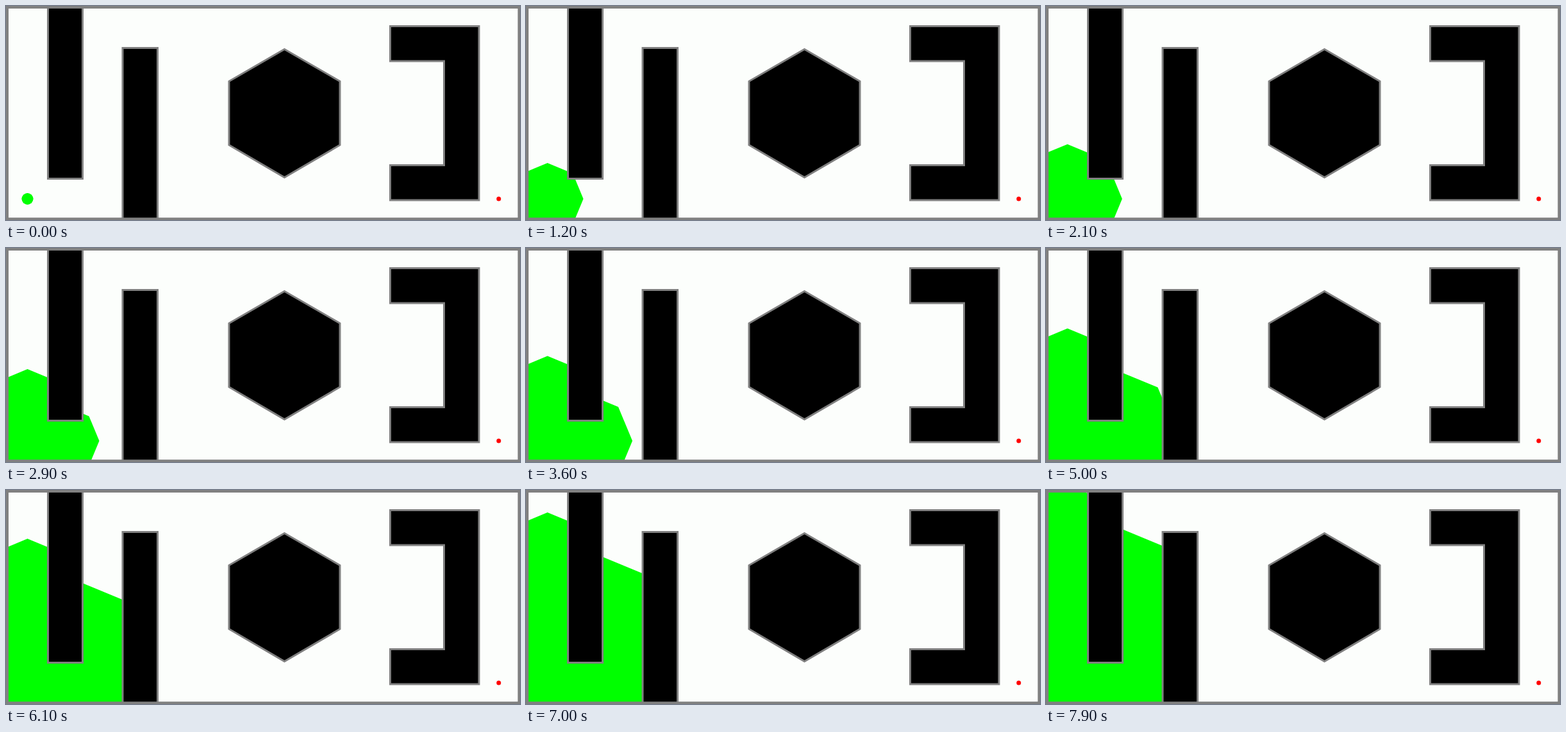
Write an HTML page without scripts that moves like this. It is 802 px wide and 334 px high and loops after 8000 ms.

```html
<!DOCTYPE html>
<html lang="en">
<head>
<meta charset="utf-8">
<title>Flood search around obstacles</title>
<style>
  @property --r {
    syntax: "<number>";
    inherits: true;
    initial-value: 9;
  }
  html, body {
    margin: 0;
    width: 100%;
    height: 100%;
    overflow: hidden;
    background: #fcfefc;
  }
  svg { display: block; width: 802px; height: 334px; }

  .wave { fill: #0f0; animation: spread 8s infinite; }
  .near { transform: translate(33.5px, 301px) scale(calc(var(--r) / 100)); }
  /* The front bends around the first wall's corner, 100 units from the start. */
  .bent { transform: translate(121px, 271px) scale(max(0, calc(var(--r) / 100 - 1))); }
  .walls { fill: #000; stroke: #808080; stroke-width: 3; }
  .frame { fill: none; stroke: #808080; stroke-width: 4; }

  /* One step per 100 ms. */
  @keyframes spread {
    0%     { --r: 9;     animation-timing-function: steps(1); }
    1.25%  { --r: 15.7;  animation-timing-function: steps(2); }
    3.75%  { --r: 24;    animation-timing-function: steps(5); }
    10%    { --r: 41;    animation-timing-function: steps(4); }
    15%    { --r: 56;    animation-timing-function: steps(6); }
    22.5%  { --r: 75;    animation-timing-function: steps(9); }
    33.75% { --r: 106;   animation-timing-function: steps(2); }
    36.25% { --r: 112;   animation-timing-function: steps(7); }
    45%    { --r: 132.5; animation-timing-function: steps(6); }
    52.5%  { --r: 148.5; animation-timing-function: steps(3); }
    56.25% { --r: 157.5; animation-timing-function: steps(5); }
    62.5%  { --r: 175.5; animation-timing-function: steps(4); }
    67.5%  { --r: 193;   animation-timing-function: steps(7); }
    76.25% { --r: 225;   animation-timing-function: steps(11); }
    90%    { --r: 275;   animation-timing-function: steps(7); }
    98.75%, 100% { --r: 309; animation-timing-function: steps(1); }
  }
</style>
</head>
<body>
<svg viewBox="0 0 802 334">
  <defs>
    <path id="oct" d="M0-100L70.7-70.7L100 0L70.7 70.7L0 100L-70.7 70.7L-100 0L-70.7-70.7Z"/>
    <clipPath id="open"><path d="M0 0H92V271H182V334H0Z"/></clipPath>
    <clipPath id="shade"><path d="M92 0H182V271.5H92Z"/></clipPath>
  </defs>

  <rect width="802" height="334" fill="#fcfefc"/>

  <g class="wave">
    <circle cx="33.5" cy="301" r="9"/>
    <g clip-path="url(#open)"><use class="near" href="#oct"/></g>
    <g clip-path="url(#shade)"><use class="bent" href="#oct"/></g>
  </g>

  <g class="walls">
    <path d="M65.5 0H119.5V269.5H65.5Z"/>
    <path d="M182 65.5H236.5V334H182Z"/>
    <path d="M434.5 67.5L521 117.5V217L434.5 267.5L348 217V117.5Z"/>
    <path d="M599.5 31.5H738V303H599.5V248.5H683.5V86H599.5Z"/>
  </g>

  <circle cx="768.8" cy="301" r="3.5" fill="#f00"/>
  <rect class="frame" x="2" y="2" width="798.5" height="330.3"/>
</svg>
</body>
</html>
```
